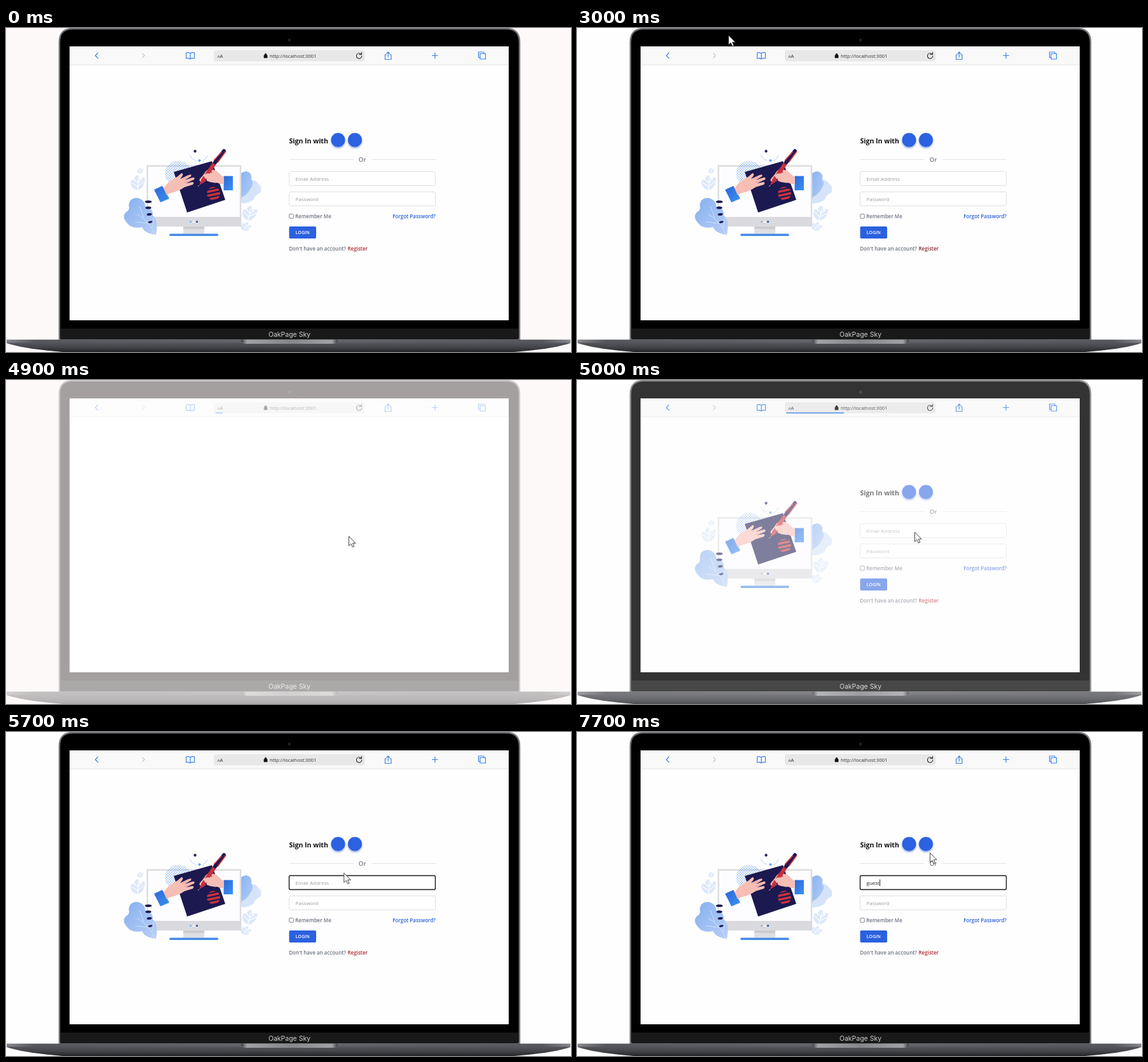
Recreate the animation shown at these times as an HTML page. Size 889 px wide and 511 px high, loop 8 s.

```html
<!DOCTYPE html>
<html lang="en">
<head>
<meta charset="utf-8">
<title>Sign in</title>
<style>
  html, body { margin: 0; width: 100%; height: 100%; overflow: hidden; background: #fff; }
  svg { display: block; width: 100%; height: 100%; }
  text { font: 8px "Open Sans", "Noto Sans", sans-serif; }
  .semi { font-weight: 600; fill: #6c7280; }
  .hint { fill: #9b9b9b; }
  .icon { fill: none; stroke: #3f83ea; stroke-width: 1.2; stroke-linecap: round; stroke-linejoin: round; }
  .field { fill: #fff; stroke: #dfdfe1; }
</style>
</head>
<body>
<svg viewBox="0 0 889 511" preserveAspectRatio="none">
  <defs>
    <linearGradient id="rim" x2="1" y2="0">
      <stop offset="0" stop-color="#85868b"/><stop offset=".05" stop-color="#55565b"/>
      <stop offset=".5" stop-color="#64656a"/><stop offset=".95" stop-color="#55565b"/>
      <stop offset="1" stop-color="#85868b"/>
    </linearGradient>
    <linearGradient id="base" x2="0" y2="1">
      <stop offset="0" stop-color="#5d5e63"/><stop offset=".55" stop-color="#47484d"/>
      <stop offset="1" stop-color="#242528"/>
    </linearGradient>
    <linearGradient id="notch" x2="1" y2="0">
      <stop offset="0" stop-color="#3c3d41"/><stop offset=".06" stop-color="#a1a2a6"/>
      <stop offset=".5" stop-color="#85868a"/><stop offset=".94" stop-color="#a1a2a6"/>
      <stop offset="1" stop-color="#3c3d41"/>
    </linearGradient>
    <linearGradient id="bush" x2="1" y2="1">
      <stop offset="0" stop-color="#86b0f0"/><stop offset="1" stop-color="#b9d0f6"/>
    </linearGradient>
    <linearGradient id="cuff" x2="1" y2="1">
      <stop offset="0" stop-color="#2c66d8"/><stop offset="1" stop-color="#3c93f4"/>
    </linearGradient>
    <pattern id="dots" width="4" height="4" patternUnits="userSpaceOnUse">
      <circle cx="1" cy="1" r=".85" fill="#6ea3ea"/><circle cx="3" cy="3" r=".85" fill="#6ea3ea"/>
    </pattern>
    <clipPath id="disc"><circle cx="326.500" cy="261" r="10.500"/></clipPath>
    <filter id="soft" x="-50%" y="-50%" width="200%" height="200%"><feGaussianBlur stdDeviation="1.5"/></filter>
    <g id="leaf">
      <path d="M0 12C-9 10-13 2-10-4C-8-5-6-4-5-3C-6-8-3-11 0-12C2-9 3-7 3-4C6-8 9-9 11-8C12 1 9 9 0 12Z" fill="#dce8fb"/>
      <path d="M0 12L1-8M-9 0L0 6L10-2M-6-5L1 0L7-6" fill="none" stroke="#fff" stroke-width="1.200"/>
    </g>
  </defs>

  <rect id="wall" width="889" height="511"/>
  <rect x="100" y="29" width="691" height="432" fill="#fff"/>

  <g id="laptop">
    <path d="M84 491V22Q84 1 105 1H787Q808 1 808 22V491Z" fill="#000" stroke="#77787d" stroke-width="2.400"/>
    <path d="M86 474H806V491H86Z" fill="#19191a"/>
    <circle cx="446" cy="19" r="2.600" fill="#17181b"/><circle cx="446" cy="19" r="1" fill="#2b3038"/>
    <path d="M1 492H888V497Q862 506 800 511H89Q28 506 1 497Z" fill="url(#base)"/>
    <path d="M1 491.500H888V496.500H1Z" fill="url(#rim)"/>
    <path d="M370 491.500H522V494Q521 498 516 498H376Q371 498 370 494Z" fill="url(#notch)"/>
    <text x="446" y="486.500" text-anchor="middle" style="font:10.500px Inter,Roboto,sans-serif" fill="#cfcfd1">OakPage Sky</text>

    <path d="M100 29H791V461H100Z" fill="#fefefe"/>
    <path d="M100 29H791V58H100Z" fill="#f9f9f9"/>
    <path d="M100 58H791" stroke="#e4e4e5"/>
    <rect x="327" y="35" width="237.500" height="17.500" rx="4" fill="#e8e8e9"/>
    <path id="load" fill="none" stroke="#3f83ea" stroke-width="1.800"/>
    <text x="332.500" y="46.500" style="font-size:6px" fill="#333">A</text>
    <text x="336.300" y="46.500" fill="#333">A</text>
    <path d="M406 43H411V47H406ZM407 43V41.500Q408.500 39 410 41.500V43" fill="#111" stroke="#111" stroke-width=".8" fill-rule="evenodd"/>
    <text x="415" y="46.500" style="font-size:7.600px" fill="#333">http://localhost:3001</text>
    <g class="icon">
      <path d="M144.500 39.500L140.500 43.500L144.500 47.500"/>
      <path d="M214.500 40L218 43.500L214.500 47" stroke="#c9c9cb"/>
      <path d="M290 40Q287 38 283.500 39V48Q287 47 290 49Q293 47 296.500 48V39Q293 38 290 40V49"/>
      <path d="M559 41.500A4.200 4.200 0 1 0 559.800 44M559.500 38.500V41.700H556" stroke="#333"/>
      <path d="M598.500 42H596.500V49.500H606V42H604M601.300 46V38M598.800 40.300L601.300 37.800L603.800 40.300"/>
      <path d="M670.500 43.500H679.500M675 39V48"/>
      <path d="M745.500 46.500H743.500V38H752V40M746 40.500H754.500V49H746Z"/>
    </g>

    <g id="page">
      <g id="art">
        <use href="#leaf" x="207" y="244"/>
        <use href="#leaf" transform="translate(211 225) scale(.4)"/>
        <use href="#leaf" transform="translate(383 292) rotate(12)"/>
        <use href="#leaf" transform="translate(377 313) rotate(30) scale(.65)"/>
        <path d="M368 276V240Q375 233 382 239Q393 238 397 246Q404 251 400 260Q392 263 390 270Q382 278 368 276Z" fill="#d6e4fa"/>
        <path d="M366 278V238Q367 227 378 226Q388 228 386 239Q391 246 385 253Q380 263 372 266Z" fill="url(#bush)"/>

        <path d="M222.500 217.500H369V312H222.500Z" fill="#fdfdff" stroke="#dcdde1" stroke-width="2.400"/>
        <path d="M221.500 298H370V312.500H221.500Z" fill="#dadade"/>
        <path d="M279 313H312V324.500H279Z" fill="#dfdfe2"/><path d="M279 313H312V317H279Z" fill="#cbcbd0"/>
        <path d="M257.500 324.500H333.500V328H257.500Z" fill="#4389e8"/>
        <circle cx="290.500" cy="305.500" r="1.500" fill="#88b3f1"/><circle cx="295.500" cy="305.500" r="1.500" fill="#fff"/>
        <circle cx="300.500" cy="305.500" r="1.600" fill="#24509f"/>

        <circle cx="271" cy="230" r="20.500" fill="url(#dots)"/>
        <path d="M264 227L324 210L345 271L285 291Z" fill="#1c1950"/>
        <g clip-path="url(#disc)">
          <path d="M315 253L337 248M314 259L338 254M315 265L339 260M317 271L338 266" stroke="#c5323f" stroke-width="3.600"/>
        </g>

        <path d="M233 255L246 249L257 269L243 275Z" fill="url(#cuff)"/>
        <path d="M248 253Q255 242 264 238Q271 234 276 229Q280 229 277 234L274 238L287 232Q293 230 291 234L281 240L293 236Q298 235 296 239L283 245L293 243Q297 243 294 247L281 251Q271 258 257 261L253 264Z" fill="#f6beb4"/>
        <path d="M276 239L290 233M280 244L294 239" fill="none" stroke="#dc9894" stroke-width=".700"/>
        <path d="M342.500 233.500H357V256H342.500Z" fill="url(#cuff)"/>
        <path d="M343 236Q336 230 331 225L320 222Q314 225 311 231L305 238Q303 243 308 242L315 237L316 241Q324 245 332 244Q338 247 343 246Z" fill="#f6beb4"/>
        <path d="M304 248L308 237L315 241Z" fill="#c5323f"/>
        <path d="M310 240L331 209" stroke="#c92f3d" stroke-width="6"/>
        <path d="M329 212L343 194" stroke="#1c1950" stroke-width="6" stroke-linecap="round"/>
        <path d="M327 209L340 195M333 212L346 194M318 224L324 228" fill="none" stroke="#c92f3d" stroke-width="1.800"/>
        <path d="M310 232Q318 227 323 231Q320 235 314 238" fill="#f6beb4"/>
        <path d="M304 248L302 250" stroke="#fff" stroke-width=".800"/>
        <path d="M297.500 191.500L300 194.300L297.500 197L295 194.300Z" fill="#1c1950"/>
        <path d="M304.500 206.500L307 209L304.500 211.500L302 209Z" fill="#69a2ef"/>
        <path d="M289 200Q292 207 299 209M317 201Q315 207 309 210" fill="none" stroke="#b7d0f5"/>

        <path d="M236 326Q218 324 214 314Q198 318 190 307Q182 298 188 291Q196 287 193 279Q195 267 207 268Q218 270 220 283Q232 284 231 296Q240 301 236 326Z" fill="url(#bush)"/>
        <path d="M234 325Q226 305 207 294M224 308L203 306M217 300L210 281M230 315L233 299" fill="none" stroke="#d8e6fc" stroke-width=".800"/>
        <g fill="#1c1950">
          <ellipse cx="224" cy="274" rx="5.500" ry="2.100"/><ellipse cx="224" cy="283.500" rx="4.600" ry="2"/>
          <ellipse cx="225.500" cy="294" rx="4" ry="1.900" transform="rotate(-8 225.500 294)"/>
          <ellipse cx="227" cy="306" rx="3.500" ry="1.600" transform="rotate(-12 227 306)"/>
        </g>
      </g>

      <text x="445.500" y="182" style="font-size:10.500px;font-weight:700" fill="#111">Sign In with</text>
      <g fill="#8ba6e6" filter="url(#soft)"><circle cx="522.500" cy="178.500" r="11"/><circle cx="549" cy="178.500" r="11"/></g>
      <g fill="#2c61e0"><circle cx="522.500" cy="176.500" r="11"/><circle cx="549" cy="176.500" r="11"/></g>
      <path d="M446 207.500H547M575 207.500H676" stroke="#e0e4e8"/>
      <text x="560.500" y="211" text-anchor="middle" style="font-size:9.300px" class="semi">Or</text>
      <rect id="email" class="field" x="445.500" y="226.500" width="230" height="22" rx="2"/>
      <text id="entry" x="455.500" y="240.700"></text>
      <path id="caret" stroke="#111" stroke-width=".900"/>
      <rect class="field" x="445.500" y="258.500" width="230" height="22" rx="2"/>
      <text x="455.500" y="272.700" class="hint">Password</text>
      <rect x="445.700" y="293.500" width="6.600" height="6.600" rx="1" fill="#fff" stroke="#777" stroke-width=".900"/>
      <text x="455" y="300" class="semi">Remember Me</text>
      <text x="676" y="300" text-anchor="end" style="font-weight:600" fill="#2b60df">Forgot Password?</text>
      <rect x="445.500" y="313" width="42.500" height="19" rx="2" fill="#2b60df"/>
      <text x="466.700" y="325.300" text-anchor="middle" style="font-size:7.100px;font-weight:600" fill="#fff">LOGIN</text>
      <text x="535" y="350.700" text-anchor="end" class="semi">Don't have an account?</text>
      <text id="join" x="537.500" y="350.700" style="font-weight:600">Register</text>
    </g>
  </g>

  <circle id="press" cx="523.500" cy="233.500" r="14" fill="#4d4d4d" fill-opacity=".9" stroke="#3c3c3c" stroke-opacity=".9"/>
  <path id="arrow" d="M.5 .5V15.500L4 12.300L6.300 17.500L8.700 16.500L6.400 11.400H11Z" fill="#fff" stroke="#333" stroke-width=".900"/>
</svg>
<script>
const LOOP = 8000, STEP = 100;
const $ = id => document.getElementById(id);
const set = (id, attrs) => { for (const k in attrs) $(id).setAttribute(k, attrs[k]); };
const show = (id, on) => set(id, { visibility: on ? 'visible' : 'hidden' });

// Pointer moves: begin, end, x, y
const moves = [
  [1100, 1500, 240, 13], [3000, 3000, 238, 11], [3900, 3900, 400, 158],
  [4000, 4000, 458, 211], [4700, 4700, 543, 251], [4900, 4900, 539, 246],
  [5000, 5100, 523, 233], [5500, 6300, 555, 190]
];
const keys = [6800, 7100, 7300, 7500, 7700];
const word = 'guest';

function pointer(t) {
  let x = 300, y = -20;
  for (const [a, b, tx, ty] of moves) {
    if (t < a) break;
    const p = Math.min(1, (t - a + STEP) / (b - a + STEP));
    const e = p * p * (3 - 2 * p);
    x += (tx - x) * e;
    y += (ty - y) * e;
  }
  return [x, y];
}

// Value of the last [time, value] pair already reached
const hold = (t, pairs) => pairs.filter(p => p[0] <= t).pop()[1];

function draw(time) {
  const t = Math.floor(time / STEP) * STEP;
  set('wall', { fill: hold(t, [[0, '#fdf9f8'], [1100, '#fefefe'], [4900, '#fdf9f8'], [5000, '#fefefe']]) });
  set('laptop', { opacity: hold(t, [[0, 1], [3900, .4], [4000, 0], [4900, .36], [5000, .8], [5100, 1]]) });
  set('page', { opacity: hold(t, [[0, 1], [4000, 0], [5000, .7], [5100, 1]]) });

  const end = hold(t, [[0, 330], [4900, 341], [5000, 420], [5100, 497], [5200, 562], [5300, 330]]);
  set('load', { d: `M329.500 51.800H${end}` });
  show('load', end > 330);

  const focus = t >= 5200;
  set('email', { style: focus ? 'stroke:#1a1a1a;stroke-width:1.400' : '' });
  const typed = word.slice(0, keys.filter(k => k <= t).length);
  $('entry').textContent = typed || 'Email Address';
  set('entry', { fill: typed ? '#222' : '#9b9b9b' });
  show('caret', typed);
  if (typed) set('caret', { d: `M${456.2 + $('entry').getComputedTextLength()} 232.500V243` });

  set('join', { fill: t >= 3000 && t < 4000 ? '#8a2a36' : '#b62c35' });

  const down = t >= 5100 && t < 5300;
  const [x, y] = pointer(t);
  show('press', down);
  show('arrow', t >= 1100 && !down);
  set('arrow', { transform: `translate(${x} ${y})` });
}

const begin = performance.now();
function tick() {
  draw((performance.now() - begin) % LOOP);
  requestAnimationFrame(tick);
}
tick();
</script>
</body>
</html>
```
